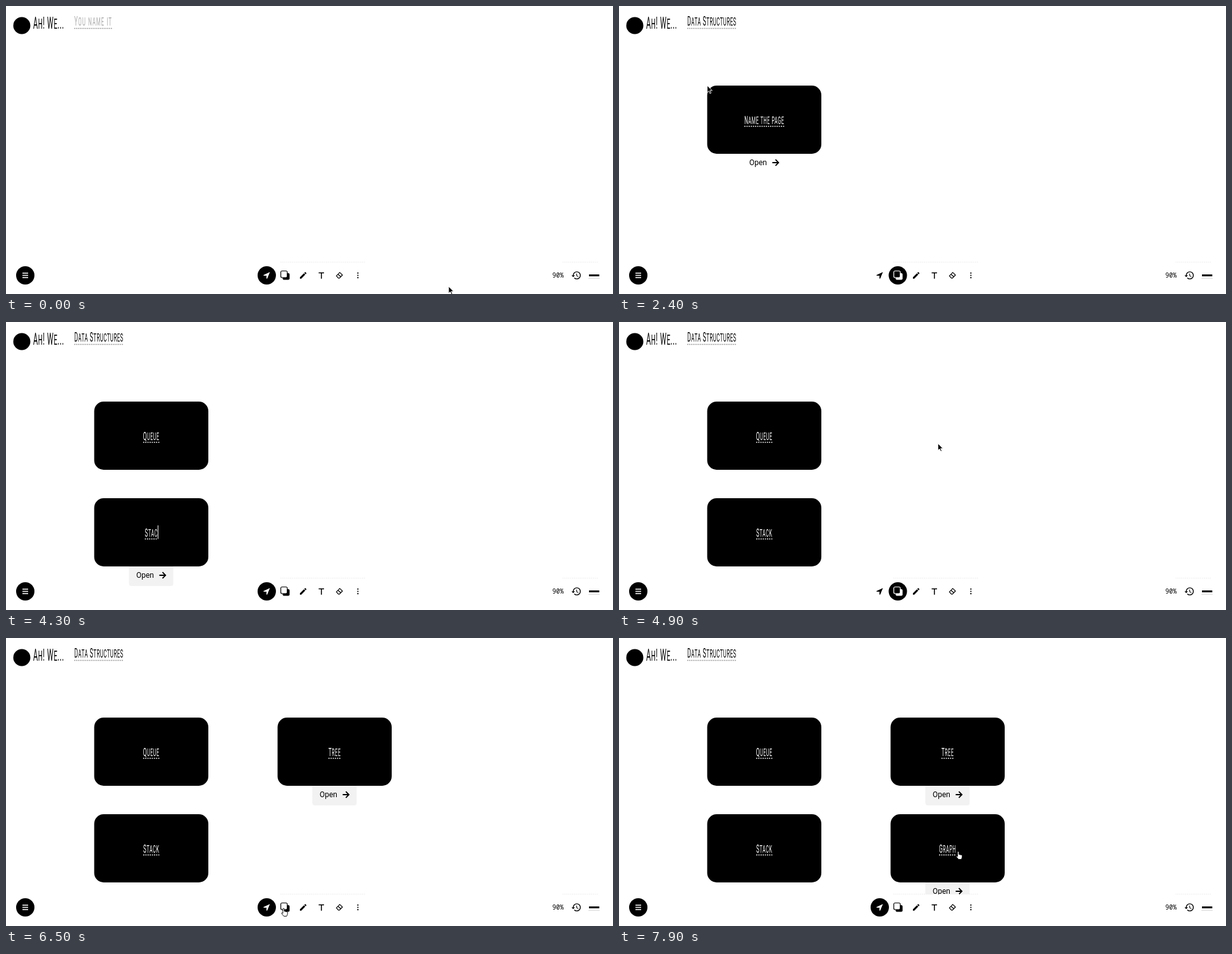
These frames come from a looping animation (960 by 456 pixels, 8000 ms). An HTML page:

```html
<!DOCTYPE html>
<html lang="en">
<head>
<meta charset="utf-8">
<title>Whiteboard</title>
<style>
  html, body { margin: 0; width: 100%; height: 100%; overflow: hidden; background: #fff; }
  svg { display: block; width: 960px; height: 456px; }
  .hand { font: 400 20px Roboto, "Liberation Sans", sans-serif; text-transform: uppercase; letter-spacing: 1.2px; white-space: pre; }
  .hand tspan { font-size: .88em; }
  .empty { letter-spacing: 2.4px; fill: #aaa; }
  .logo { font-size: 25.4px; }
  .card { fill: #fff; }
  .card .hand { font-size: 18.6px; }
  .open { font: 400 12px Roboto, sans-serif; fill: #000; }
  .hover { fill: #f2f2f2; }
  .rule { stroke-width: 1.4; stroke-dasharray: 1.5 1.4; stroke: #888; }
  .card .rule, .edit .rule { stroke-width: 1.7; stroke-dasharray: 1.8 1.6; stroke: #000; }
  .card .rule, .card .caret { stroke: #fff; }
  .caret { stroke: #000; visibility: hidden; }
  .edit .caret { visibility: visible; }
  .line { fill: none; stroke: currentColor; stroke-width: 1.5; }
  .thin { stroke-width: 1.15; stroke-linejoin: round; }
  .bold { stroke-width: 1.8; }
  .tool { color: #000; fill: #000; --back: #fff; }
  .tool > circle { visibility: hidden; fill: #000; }
  .tool.on { color: #fff; fill: #fff; --back: #000; }
  .tool.on > circle { visibility: visible; }
  .guide { fill: none; stroke: #b8383b; }
  .mid { stroke: #86191c; stroke-width: 2.5; }
  .faint { stroke: #eee; stroke-dasharray: 2 1; }
</style>
</head>
<body>
<svg viewBox="0 0 960 456" xmlns="http://www.w3.org/2000/svg">
  <circle cx="25" cy="31" r="13.5"/>
  <text class="hand logo" transform="translate(43 36) scale(.44 1)">A<tspan>h</tspan>! W<tspan>e</tspan>...</text>
  <g id="title" transform="translate(108 30.5)"></g>
  <g id="cards"></g>
  <path id="mids" class="guide mid"/>
  <path id="edges" class="guide"/>

  <rect x="398" y="406" width="182" height="41" fill="#fff"/>
  <path class="faint" d="M434 405.5H568M880 405.5H936"/>
  <circle cx="30.5" cy="426.5" r="14.5"/>
  <path d="M26 423h9M26 426.5h9M26 430h9" stroke="#fff" stroke-width="1.7"/>

  <g class="tool" id="select" transform="translate(412.4 426.5)">
    <circle r="14.5"/>
    <path d="M5-5.2L-5.2-.6-4.9.5H-.5V4.9L.6 5.2z"/>
  </g>
  <g class="tool" id="shape" transform="translate(441 426.5)">
    <circle r="14.5"/>
    <rect x="-3.5" y="-3.5" width="11" height="10.5" rx="2"/>
    <rect class="line" x="-6.4" y="-7" width="10.2" height="10.5" rx="2" style="fill:var(--back);stroke-width:1.2"/>
  </g>
  <path transform="translate(470 426.5) scale(.57) translate(-12 -12)" d="M3 17.25V21h3.75L17.81 9.94l-3.75-3.75L3 17.25zM20.71 7.04c.39-.39.39-1.02 0-1.41l-2.34-2.34c-.39-.39-1.02-.39-1.41 0l-1.83 1.83 3.75 3.75 1.83-1.83z"/>
  <path class="line" d="M494.5 422.6h8.5M498.8 422.6v9.2"/>
  <path id="eraser" class="line thin" transform="translate(527.3 426.5)" d="M-4.8.8L.5-4.6 4.8-.5-.2 4.5H-1.4ZM-2.2-1.8L2.2 2.2"/>
  <path id="trash" class="line thin" transform="translate(527.5 426.5)" d="M-5.4-3.8H5.4M-2-4.2V-5.4H2V-4.2M-4-3.4V5H4V-3.4M-1.4-1V3M1.4-1V3"/>
  <path d="M556.5 422.8v0m0 3.7v0m0 3.7v0" stroke="#000" stroke-width="2.2" stroke-linecap="round"/>

  <text x="864" y="430" style="font:10px 'Noto Sans Mono','DejaVu Sans Mono',monospace">90%</text>
  <path transform="translate(901.7 426.5) scale(.7) translate(-11.5 -12)" d="M13 3a9 9 0 0 0-9 9H1l3.89 3.89.07.14L9 12H6a7 7 0 1 1 7 7c-1.93 0-3.68-.79-4.94-2.06l-1.42 1.42A8.95 8.95 0 0 0 13 21a9 9 0 0 0 0-18zm-1 5v5l4.28 2.54.72-1.21-3.5-2.08V8H12z"/>
  <rect x="922" y="425" width="16.3" height="3"/>
  <path d="M921 431.5h18" stroke="#ddd"/>

  <g id="ring" fill="none" stroke="#fff"><circle r="18"/><circle r="16" stroke="#aaa" stroke-width=".8"/></g>
  <path id="arrow" stroke="#fff" stroke-width=".9" d="M0 0V11l2.6-2.4 1.8 4 1.8-.8-1.8-3.9h3.6z"/>
  <path id="finger" fill="#fff" stroke="#000" stroke-width=".9" d="M-1.1 6V1.2a1.1 1.1 0 0 1 2.2 0V4.6L5.3 5.5q1.2.3 1.1 1.6L5.9 10.2l-1 2.3H.4L-3.1 8.2q-.4-1 .6-1.1L-1.1 8z"/>
</svg>
<script>
const LOOP = 8000, STEP = 100, PACE = 45, SQUEEZE = .44;
const W = 180.5, H = 108;
const LEFT = 139.5, RIGHT = 429.5, TOP = 126, LOW = 279;
const GRAB = [24, 28], NAME = [W / 2, H / 2], TOOL = [439, 428], TITLE = [138, 26];

// pick: shape tool clicked, born: card put down, type: naming begins
const title = { text: "Data Structures", hint: "You name it", type: 1060 };
const cards = [
  { text: "Queue", at: [LEFT, TOP], pick: 2000, born: 2350, type: 2720 },
  { text: "Stack", at: [LEFT, LOW], from: [115, 290], pick: 3300, born: 3600, type: 4100 },
  { text: "Tree", at: [RIGHT, TOP], from: [512, 165], snap: [419.5, TOP], pick: 4740, born: 4960, type: 5780, keep: true },
  { text: "Graph", at: [RIGHT, LOW], from: [476, 292], pick: 6550, born: 6820, type: 7340, keep: true }
];

const $ = id => document.getElementById(id);
const add = (p, q) => [p[0] + q[0], p[1] + q[1]];
const sub = (p, q) => [p[0] - q[0], p[1] - q[1]];
const done = item => item.type + item.text.length * PACE;
const grabbed = c => c.born + 80;
const dropped = c => c.type - 160;
const show = (el, on) => { el.style.display = on ? "" : "none"; };
const move = (el, [x, y]) => el.setAttribute("transform", `translate(${x} ${y})`);

// Pointer stops follow from the card schedule
const stops = [[0, [700, 444]], [700, TITLE], [done(title), TITLE]];
for (const c of cards) {
  const name = add(c.at, NAME);
  stops.push([c.pick - 80, TOOL], [c.pick, TOOL], [c.born - 20, c.from || c.at]);
  if (c.from) stops.push([grabbed(c), add(c.from, GRAB)]);
  if (c.snap) stops.push([dropped(c) - 220, add(c.snap, GRAB)]);
  stops.push(c.from ? [dropped(c), add(c.at, GRAB)] : [c.born + 100, c.at]);
  stops.push([c.type - 40, name], [done(c), name]);
}
stops.push([LOOP - 150, [536.5, 338]]);

function pointer(t) {
  const i = stops.findIndex(s => s[0] > t);
  if (i < 0) return stops[stops.length - 1][1];
  const [t0, a] = stops[i - 1], [t1, b] = stops[i];
  const u = (t - t0) / (t1 - t0), e = u * u * (3 - 2 * u);
  return a.map((v, k) => v + (b[k] - v) * e);
}

function place(c, t) {
  if (!c.from) return c.at;
  return t < grabbed(c) ? c.from : sub(pointer(Math.min(t, dropped(c))), GRAB);
}

const labelParts = '<text class="hand"></text><line class="rule"/><line class="caret"/>';

function drawLabel(g, item, t, centred) {
  const [text, rule, caret] = g.children;
  const count = Math.floor((t - item.type) / PACE);
  const typed = count > 0 ? item.text.slice(0, count) : item.hint || "Name the page";
  text.innerHTML = typed.replace(/[a-z]+/g, "<tspan>$&</tspan>");
  text.classList.toggle("empty", count < 1 && !centred);
  g.classList.toggle("edit", t >= item.type && t < done(item));
  const w = text.getComputedTextLength() * SQUEEZE, x = centred ? -w / 2 : 0, y = centred ? 3.5 : 5;
  text.setAttribute("transform", `translate(${x} 0) scale(${SQUEEZE} 1)`);
  const set = (el, x1, y1, x2, y2) =>
    Object.entries({ x1, y1, x2, y2 }).forEach(([k, v]) => el.setAttribute(k, v));
  set(rule, x, y, x + w, y);
  set(caret, x + w + .5, -18, x + w + .5, y);
}

// Alignment lines between the dragged card and its neighbours
function drawGuides(card, t) {
  let edges = "", mids = "";
  const line = (a, b) => `M${a}L${b}`;
  const cross = ([x, y]) => `M${x - 2} ${y - 2}l4 4m0-4l-4 4`;
  const edge = pts => { edges += line(pts[0], pts[pts.length - 1]) + pts.map(cross).join(""); };
  if (card) {
    const [x, y] = place(card, t);
    let column = false, row = false;
    for (const o of cards) {
      if (o === card || t < o.born) continue;
      const [ox, oy] = place(o, t);
      if (Math.abs(y - oy) < 1) {
        row = true;
        for (const ey of [oy, oy + H]) edge([ox, ox + W, x, x + W].map(px => [px, ey]));
        mids += line([ox, oy + H / 2], [x + W / 2, oy + H / 2]);
      }
      if (Math.abs(x - ox) < 1) {
        column = true;
        for (const ex of [ox, ox + W]) edge([oy, oy + H, y, y + H].map(py => [ex, py]));
        mids += line([ox + W / 2, oy], [ox + W / 2, y + H / 2]);
      }
    }
    if (row && !column) edge([y - 34, y, y + H].map(py => [x + W, py]));
  }
  $("edges").setAttribute("d", edges);
  $("mids").setAttribute("d", mids);
}

$("title").innerHTML = labelParts;
$("cards").innerHTML = cards.map(() => `
  <g class="card">
    <g class="more">
      <rect class="hover" x="55" y="100" width="70" height="39" rx="4"/>
      <text class="open" x="66.5" y="126">Open</text>
      <path class="line bold" d="M103 122h9.5M108 117.2l4.8 4.8-4.8 4.8"/>
    </g>
    <rect width="${W}" height="${H}" rx="15" fill="#000"/>
    <g class="name" transform="translate(${W / 2} 61)">${labelParts}</g>
  </g>`).join("");
cards.forEach((c, i) => { c.el = $("cards").children[i]; });

function render(t) {
  const [x, y] = pointer(t);
  drawLabel($("title"), title, t, false);
  for (const c of cards) {
    show(c.el, t >= c.born);
    move(c.el, place(c, t));
    show(c.el.querySelector(".more"), c.keep || t < done(c) + 150);
    show(c.el.querySelector(".hover"), c.from && t >= c.type);
    drawLabel(c.el.querySelector(".name"), c, t, true);
  }

  const shape = cards.some(c => t >= c.pick && t < c.born + 100);
  const trash = cards.some(c => c.from && t >= c.born && t < c.type);
  $("select").classList.toggle("on", !shape);
  $("shape").classList.toggle("on", shape);
  show($("trash"), trash);
  show($("eraser"), !trash);

  const dragged = cards.find(c => c.from && t >= grabbed(c) && t < dropped(c) + 80);
  drawGuides(dragged, t);

  const typing = [title, ...cards].some(c => t >= c.type - 40 && t < done(c));
  const overName = cards.some(c => {
    const [dx, dy] = sub([x, y], add(place(c, t), NAME));
    return t >= c.born && Math.abs(dx) < 30 && Math.abs(dy) < 15;
  });
  const finger = overName || (y > 410 && x > 398 && x < 580);
  for (const id of ["arrow", "finger", "ring"]) move($(id), [x, y]);
  show($("arrow"), !typing && !finger);
  show($("finger"), !typing && finger);
  show($("ring"), dragged);
}

// The picture advances ten times a second
const start = performance.now();
function tick() {
  const t = (performance.now() - start) % LOOP;
  render(Math.floor(t / STEP) * STEP);
  requestAnimationFrame(tick);
}
tick();
</script>
</body>
</html>
```
